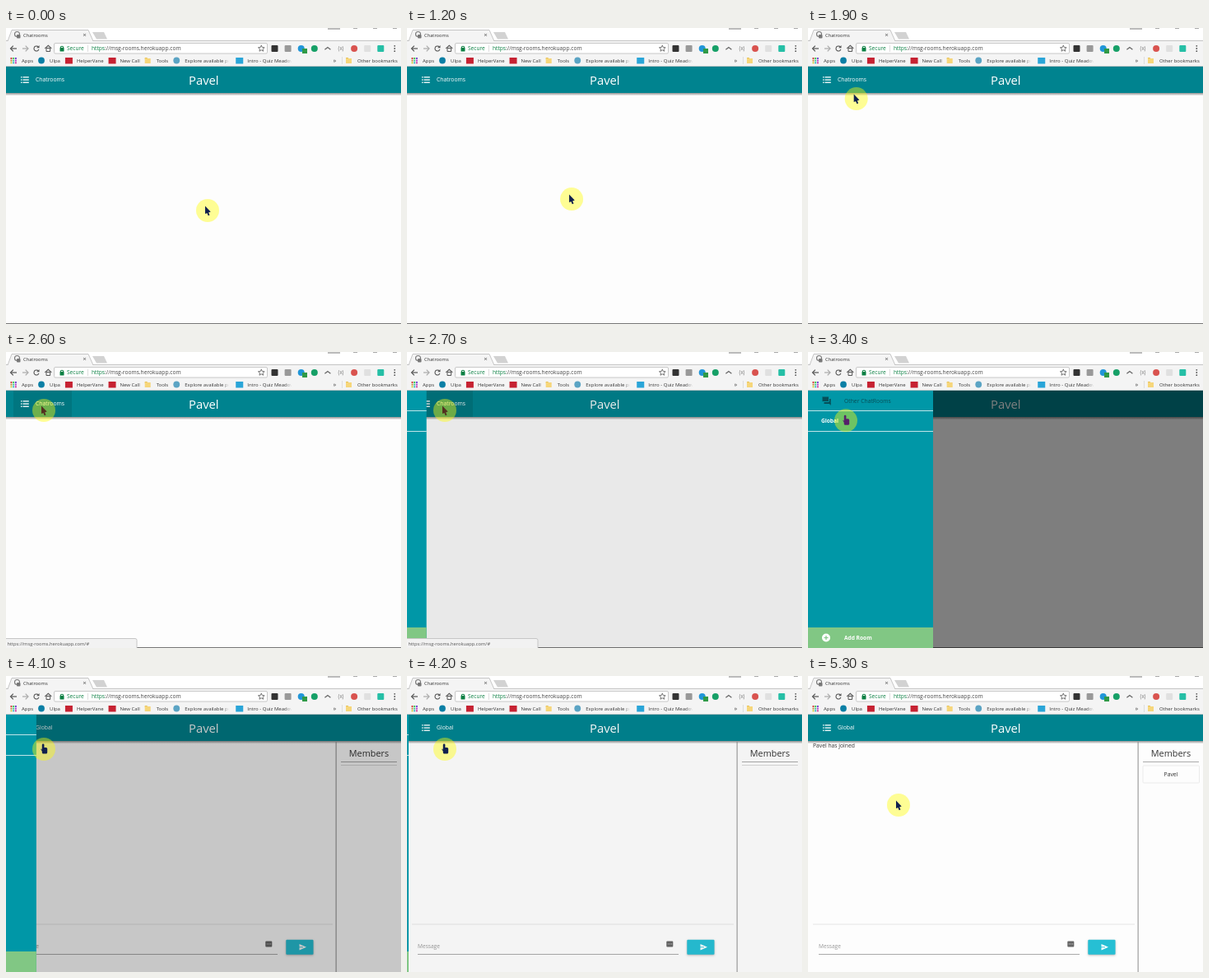
Animation of 480 by 360 pixels, one loop 5.4 s. Source, as an HTML page with a canvas:

```html
<!DOCTYPE html>
<html lang="en">
<head>
<meta charset="utf-8">
<title>Chatrooms</title>
<style>
html, body { margin: 0; width: 100%; height: 100%; overflow: hidden; background: #fff; }
canvas { display: block; width: 480px; height: 360px; }
</style>
</head>
<body>
<canvas id="stage" width="480" height="360"></canvas>
<script>
const ctx = document.getElementById('stage').getContext('2d');
const W = 480, H = 360, TOP = 47, BAR_H = 32, DRAWER_W = 152;
const LOOP = 5400, STEP = 100, SLIDE = 300;
const OPEN_AT = 2690, ROOM_AT = 4000, CLOSE_AT = 4026, JOIN_AT = 4300;
const USER = 'Pavel', SITE = '://msg-rooms.herokuapp.com';
const TEAL = '#00838f', CYAN = '#0097a7', GREEN = '#81c784', INK = '#555', DARK = '#333';

// bend above 1 makes the vertical part of a move lag behind
const MOVES = [
  { t0: 800, t1: 2100, to: [46, 71], bend: 1.6 },
  { t0: 2900, t1: 3700, to: [46, 89], bend: 1 },
  { t0: 4400, t1: 5300, to: [110, 157], bend: 4 }
];

const clamp = v => Math.max(0, Math.min(1, v));
const easeOut = (p, n) => 1 - Math.pow(1 - clamp(p), n);
const smooth = p => clamp(p) ** 2 * (3 - 2 * clamp(p));
const during = (t, a, b) => t >= a && t < b;

function rect(x, y, w, h, fill) {
  ctx.fillStyle = fill;
  ctx.fillRect(x, y, w, h);
}

function box(x, y, w, h, r, fill, stroke) {
  ctx.beginPath();
  ctx.roundRect(x, y, w, h, r);
  if (fill) { ctx.fillStyle = fill; ctx.fill(); }
  if (stroke) { ctx.strokeStyle = stroke; ctx.lineWidth = 1; ctx.stroke(); }
}

function disc(x, y, r, fill) {
  ctx.fillStyle = fill;
  ctx.beginPath();
  ctx.arc(x, y, r, 0, 7);
  ctx.fill();
}

function arc(x, y, r, from, to, color) {
  ctx.beginPath();
  ctx.arc(x, y, r, from, to);
  ctx.strokeStyle = color;
  ctx.lineWidth = 1.1;
  ctx.stroke();
}

function trace(points) {
  ctx.beginPath();
  points.forEach(p => ctx.lineTo(...p));
}

function line(points, color, width = 1.2) {
  trace(points);
  ctx.strokeStyle = color;
  ctx.lineWidth = width;
  ctx.stroke();
}

function poly(points, fill) {
  trace(points);
  ctx.closePath();
  ctx.fillStyle = fill;
  ctx.fill();
}

// angle with its tip at x, y; dx and dy lead to the first arm's end
function chevron(x, y, dx, dy, color) {
  const other = Math.abs(dx) > 3.4 ? [x - dx, y + dy] : [x + dx, y - dy];
  line([[x + dx, y + dy], [x, y], other], color);
}

function text(str, x, y, size, fill, weight = 400, align = 'left') {
  ctx.font = `${weight} ${size}px "Open Sans", "Noto Sans", sans-serif`;
  ctx.textAlign = align;
  ctx.fillStyle = fill;
  ctx.fillText(str, x, y);
  return ctx.measureText(str).width;
}

function gradient(x0, y0, x1, y1, from, to) {
  const g = ctx.createLinearGradient(x0, y0, x1, y1);
  g.addColorStop(0, from);
  g.addColorStop(1, to);
  return g;
}

function tabStrip() {
  rect(0, 0, W, 16, '#fff');
  rect(0, 15, W, 1, '#c4c4c4');
  const tab = [[2, 16], [7, 2.5], [100, 2.5], [106, 16]];
  poly(tab, '#f4f4f4');
  line(tab, '#b8b8b8', 0.8);
  poly([[105, 5], [119, 5], [123, 13.5], [110, 13.5]], '#d2d2d2');
  arc(13.5, 7.5, 3, 0, 7, '#777');
  box(13, 8, 4.5, 4.5, 1, '#777');
  text('Chatrooms', 21, 10.8, 5.75, DARK);
  text('×', 95.5, 11, 8, INK, 400, 'center');
  rect(391, 0, 15, 2, '#bbb');
  for (let x = 422; x < W; x += 24) rect(x, 0, 5, 1, '#aaa');
}

function navButtons() {
  line([[6, 25], [13, 25]], INK);
  chevron(5.5, 25, 3.3, 3.3, INK);
  line([[20, 25], [27, 25]], '#aaa');
  chevron(27, 25, -3.3, 3.3, '#aaa');
  arc(37, 25, 3, 0.3, 5.4, INK);
  poly([[40.5, 21], [40.5, 24.3], [37.2, 24.3]], INK);
  chevron(51.3, 21.3, 4, 3.6, INK);
  box(49, 24.5, 4.6, 4, 0, null, INK);
}

function star(x, y, r) {
  const points = Array.from({ length: 11 }, (_, i) => {
    const a = i * Math.PI / 5 - Math.PI / 2, d = i % 2 ? r * 0.45 : r;
    return [x + d * Math.cos(a), y + d * Math.sin(a)];
  });
  line(points, '#666', 0.9);
}

function toolbar() {
  rect(0, 16, W, 31, '#f4f4f4');
  rect(3, 15, 102, 2, '#f4f4f4');
  navButtons();
  box(58.5, 18.5, 259, 12.5, 1.5, '#fff', '#c8c8c8');
  const safe = '#0b8043';
  box(65.5, 24, 5, 4.5, 0.5, safe);
  arc(68, 24, 1.7, Math.PI, 0, safe);
  text('Secure', 74, 27.3, 6.6, safe);
  rect(99, 21, 1, 8, '#ddd');
  const w = text('https', 104, 27.3, 6.67, safe);
  text(SITE, 104 + w, 27.3, 6.67, '#444');
  star(310.3, 25, 4);
  ['#333', '#999', '#2196d8', '#16a067', '^', '(x)', '#d9534f', '#e0e0e0', '#26bfa6'].forEach((mark, i) => {
    const x = 326.5 + i * 16.1;
    if (mark === '^') chevron(x, 23.5, 3.5, 2.8, '#666');
    else if (mark === '(x)') text(mark, x, 27, 6.2, '#777', 400, 'center');
    else if ([2, 3, 6].includes(i)) disc(x, 25, 4, mark);
    else box(x - 4, 21, 8, 8, 1, mark);
  });
  rect(360, 25, 6, 6, '#2f9a47');
  for (let i = -1; i < 2; i++) disc(472.3, 25 + i * 3.2, 0.9, INK);
}

function folder(x) {
  rect(x, 36, 3, 2, '#e8c25a');
  rect(x, 37, 7, 6, '#f6d67b');
}

const favicon = {
  grid(x) {
    for (let i = 0; i < 9; i++)
      rect(x + 0.5 + i % 3 * 2.7, 36 + Math.floor(i / 3) * 2.7, 1.9, 1.9, `hsl(${i * 130}, 60%, 50%)`);
  },
  dot: (x, c) => disc(x + 4, 39.5, 3.9, c),
  square: (x, c) => rect(x, 36, 9, 7.5, c),
  folder
};

function bookmarks() {
  const y = 41.5, red = '#c62232', maxW = 54;
  let x = 5;
  [
    ['grid', 'Apps'], ['dot', 'Ulpa', '#0b7fa5'], ['square', 'HelperVane', red],
    ['square', 'New Call', red], ['folder', 'Tools'],
    ['dot', 'Explore available po', '#5ba4c4'], ['square', 'Intro - Quiz Meadow', '#2aa5d8']
  ].forEach(([kind, label, color]) => {
    favicon[kind](x, color);
    const left = x + 14, end = left + maxW;
    const w = text(label, left, y, 6, gradient(end - 8, 0, end, 0, DARK, 'rgba(51,51,51,0)'));
    x = left + Math.min(w, maxW + 2) + 6;
  });
  text('»', 397.5, y, 7.5, '#444');
  rect(408, 35, 1, 9, '#ddd');
  folder(413);
  text('Other bookmarks', 427, y, 5.95, DARK);
  rect(0, TOP - 1, W, 1, '#b8c4c5');
}

function header(title, hover) {
  const bottom = TOP + BAR_H;
  rect(0, TOP, W, BAR_H, TEAL);
  rect(0, bottom, W, 4, gradient(0, bottom, 0, bottom + 3.5, 'rgba(0,0,0,.42)', 'rgba(0,0,0,0)'));
  if (hover) rect(9, TOP, 71, BAR_H, 'rgba(0,0,0,.1)');
  for (let i = -1; i < 2; i++) {
    const y = 62.4 + i * 3.2;
    rect(18, y, 1.5, 1.3, '#fff');
    rect(20.5, y, 7.3, 1.3, '#fff');
  }
  text(title, 36, 65.4, 6.8, '#fff');
  text(USER, 222, 69, 14.8, '#fff');
}

function room(joined) {
  rect(400.6, 80, 1, 280, '#8c8c8c');
  text('Members', 441, 97.8, 10.9, DARK, 400, 'center');
  rect(407, 104, 68, 1, '#aaa');
  if (joined) {
    box(407, 109, 68.5, 21, 1, null, '#ebebeb');
    text(USER, 441, 122, 6.8, DARK, 400, 'center');
    text(USER + ' has joined', 6, 87.3, 6.75, DARK);
  } else {
    rect(407, 108, 68, 1, '#d8d8d8');
  }
  rect(6, 301.5, 391, 1, '#e6e6e6');
  text('Message', 13, 330.7, 6.6, '#9a9a9a');
  rect(13, 338, 317, 1, '#aaa');
  box(315.3, 322.5, 8, 7, 1, '#666');
  for (let i = 0; i < 3; i++) rect(317 + i * 2, 325.5, 0.9, 0.9, '#eee');
  ctx.save();
  ctx.shadowColor = 'rgba(0,0,0,.28)';
  ctx.shadowBlur = 2.5;
  ctx.shadowOffsetY = 1;
  box(340.3, 320.8, 33.2, 18, 1, '#26bfd4');
  ctx.restore();
  poly([[356.5, 326], [365, 329.8], [356.5, 333.6]], '#fff');
  line([[356, 329.8], [361, 329.8]], '#26bfd4', 0.9);
}

function drawer(left) {
  const ink = '#064f58', rule = 'rgba(255,255,255,.75)';
  ctx.save();
  ctx.translate(left, 0);
  rect(0, TOP, DRAWER_W, H - TOP, CYAN);
  box(19.5, 57, 8.2, 6, 0.5, ink);
  poly([[25, 62], [27.7, 62], [27.7, 65]], ink);
  box(17, 54, 8.5, 6.5, 0.5, ink, CYAN);
  text('Other ChatRooms', 44, 61.5, 6.8, ink);
  rect(0, 71, DRAWER_W, 1, rule);
  text('Global', 16, 86.3, 6.6, '#fff', 700);
  rect(0, 96, DRAWER_W, 1, rule);
  rect(0, 335, DRAWER_W, 25, GREEN);
  disc(22, 347.5, 5, '#fff');
  line([[19.5, 347.5], [24.5, 347.5]], GREEN);
  line([[22, 345], [22, 350]], GREEN);
  text('Add Room', 44, 350, 6.6, '#fff', 700);
  ctx.restore();
}

function statusBar() {
  box(-2, 348.5, 161, 13, 2, '#f2f2f2', '#c6c6c6');
  text('https' + SITE + '/#', 1.5, 356.6, 5.76, INK);
}

function pointerAt(t) {
  let [x, y] = [245, 222];
  for (const { t0, t1, to, bend } of MOVES) {
    const p = smooth((t - t0) / (t1 - t0));
    x += (to[0] - x) * p;
    y += (to[1] - y) * p ** bend;
  }
  return [x, y];
}

function pointer(t) {
  const [x, y] = pointerAt(t);
  disc(x, y, 14, 'rgba(255,253,10,.43)');
  ctx.save();
  ctx.translate(x, y);
  if (during(t, 3200, 4500)) {
    const ink = t < 3700 ? '#56206a' : '#10204e';
    box(-2.2, -6.5, 2.6, 9, 1.2, ink);
    box(-2.2, -2, 6.4, 7.5, 1.6, ink);
    poly([[-4.2, -0.5], [-1.5, 1], [0, 5.5]], ink);
  } else {
    const ink = during(t, 2500, 3200) ? '#54301f' : '#10204e';
    poly([[-3, -5.5], [-3, 4], [3.7, 1.4]], ink);
    line([[-0.5, 1], [1.6, 5.8]], ink, 1.9);
  }
  ctx.restore();
}

function draw(t) {
  const inRoom = t >= ROOM_AT, closing = t >= CLOSE_AT;
  const p = (t - (closing ? CLOSE_AT : OPEN_AT)) / SLIDE;
  const slide = easeOut(p, 5);
  const shown = closing ? 1 - slide : slide;
  const shade = closing ? 1 - easeOut(p, 3) : slide;

  rect(0, 0, W, H, '#fdfdfd');
  tabStrip();
  toolbar();
  bookmarks();
  header(inRoom ? 'Global' : 'Chatrooms', during(t, 2200, 3000));
  if (inRoom) room(t >= JOIN_AT);
  else rect(0, H - 1, W, 1, '#777');
  rect(0, TOP, W, H - TOP, `rgba(0,0,0,${(shade / 2).toFixed(3)})`);
  if (shown > 0) drawer((shown - 1) * DRAWER_W);
  if (during(t, 2400, 3200)) statusBar();
  pointer(t);
}

const start = performance.now();
function tick() {
  const t = (performance.now() - start) % LOOP;
  draw(Math.floor(t / STEP) * STEP);
  requestAnimationFrame(tick);
}
tick();
</script>
</body>
</html>
```
